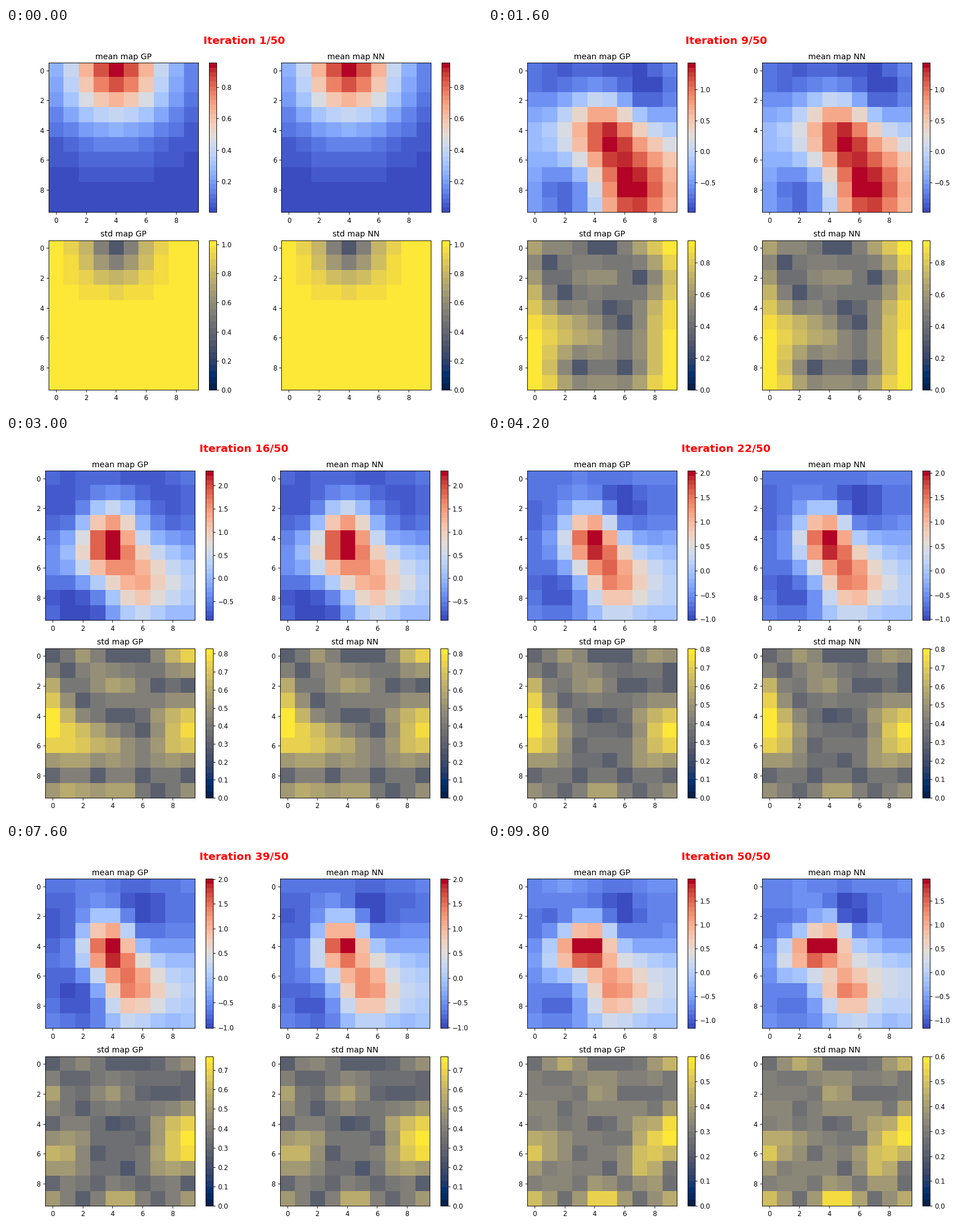
Animation, 837 px wide and 669 px high, one loop 10 s. Source, as a matplotlib script:

```python
import numpy as np
import matplotlib.pyplot as plt
from matplotlib.animation import FuncAnimation
from matplotlib.colors import Normalize

W, H, DPI = 837, 669, 83.7
SIZE = 10
NOISE = 0.05
LENGTH = 2.59
NEIGHBOURS = 12

# Cells in the order they are measured, as row * 10 + column.
VISITS = [4, 86, 32, 5, 56, 11, 27, 45, 83, 44, 0, 89, 29, 80, 97, 6, 44,
          63, 19, 75, 26, 92, 44, 27, 12, 75, 4, 6, 7, 45, 28, 75, 44, 40,
          32, 63, 89, 0, 92, 42, 79, 20, 55, 38, 71, 26, 23, 44, 97, 75]
REST = -0.65
RESPONSE = {44: 2.35, 42: 1.55, 75: 1.55, 86: 1.05, 45: .95, 56: .8, 55: .8,
            79: .4, 63: .38, 89: .25, 32: -.08, 23: -.2, 12: -.4, 83: -.5,
            97: .1, 26: -1.1}
STEPS = len(VISITS)


def response(i, cell):
    """Active cells answer a little stronger with every step."""
    return RESPONSE[cell] * (1 + .006 * i) if cell in RESPONSE else REST


GRID = np.array([divmod(n, SIZE) for n in range(SIZE * SIZE)], float)
SITES = GRID[VISITS]
VALUES = np.array([response(i, cell) for i, cell in enumerate(VISITS)])


def matern(a, b):
    d = np.linalg.norm(a[:, None] - b[None], axis=-1)
    s = np.sqrt(5) * d / LENGTH
    return (1 + s + s * s / 3) * np.exp(-s)


def posterior(x, y, at):
    k = matern(x, x) + NOISE * np.eye(len(x))
    c = matern(x, at)
    w = np.linalg.solve(k, c)
    var = 1 + NOISE - np.sum(c * w, axis=0)
    return w.T @ y, np.sqrt(np.maximum(var, 0))


def nearest_posterior(x, y, at):
    if len(x) <= NEIGHBOURS:
        return posterior(x, y, at)
    mean, std = np.empty(len(at)), np.empty(len(at))
    for i, p in enumerate(at):
        near = np.argsort(np.sum((x - p) ** 2, axis=1), kind="stable")
        near = near[:NEIGHBOURS]
        m, s = posterior(x[near], y[near], p[None])
        mean[i], std[i] = m[0], s[0]
    return mean, std


def maps(n):
    """Mean and std maps of both models after n measurements."""
    x, v = SITES[:n], VALUES[:n]
    y = (v - v.mean()) / v.std() if n > 1 else np.ones(1)
    full = posterior(x, y, GRID)
    near = nearest_posterior(x, y, GRID)
    shape = (SIZE, SIZE)
    return [m.reshape(shape) for m in (full[0], near[0], full[1], near[1])]


HISTORY = [maps(n + 1) for n in range(STEPS)]

fig = plt.figure(figsize=((W + .001) / DPI, (H + .001) / DPI), dpi=DPI,
                 facecolor="white")
heading = fig.suptitle("", fontsize=16, fontweight="bold", color="red")

SIDE, BAR_SHIFT, BAR_WIDTH = 263, 282, 13.2
TOPS = (61.5, 374.2)


def box(x, y, w, h):
    return [x / W, 1 - (y + h) / H, w / W, h / H]


def panel(row, title, cmap, norm):
    ax = fig.add_axes(box(69, TOPS[row], SIDE, SIDE))
    im = ax.imshow(np.zeros((SIZE, SIZE)), cmap=cmap, norm=norm,
                   interpolation="nearest", aspect="auto")
    ax.set_title(title, fontsize=12)
    ax.set_xticks(range(0, SIZE, 2))
    ax.set_yticks(range(0, SIZE, 2))
    cax = fig.add_axes(box(351, TOPS[row], BAR_WIDTH, SIDE))
    fig.colorbar(im, cax=cax)
    return ax, cax, im


mean_norm, std_norm = Normalize(0, 1), Normalize(0, 1)
warm = plt.get_cmap("coolwarm", 32)
gold = plt.get_cmap("cividis", 24)
panels = [
    panel(0, "mean map GP", warm, mean_norm),
    panel(0, "mean map NN", warm, mean_norm),
    panel(1, "std map GP", gold, std_norm),
    panel(1, "std map NN", gold, std_norm),
]


def columns(lo, hi):
    """Left edges of the two columns; wider bar labels push them left."""
    if lo >= 0:
        return 75, 484.3
    if hi - lo <= 2.25:
        return 61, 476
    return 69, 481.5


def draw(i):
    data = HISTORY[i]
    mean_norm.autoscale(data[0])
    std_norm.autoscale(np.array([0, data[2].max()]))
    lefts = columns(data[0].min(), data[0].max())
    for k, (ax, cax, im) in enumerate(panels):
        x, y = lefts[k % 2], TOPS[k // 2]
        ax.set_position(box(x, y, SIDE, SIDE))
        cax.set_position(box(x + BAR_SHIFT, y, BAR_WIDTH, SIDE))
        im.set_data(data[k])
    heading.set_text(f"Iteration {i + 1}/{STEPS}")
    return [heading]


anim = FuncAnimation(fig, draw, frames=STEPS, interval=200, repeat=True,
                     repeat_delay=0, blit=False)
plt.show()
```
